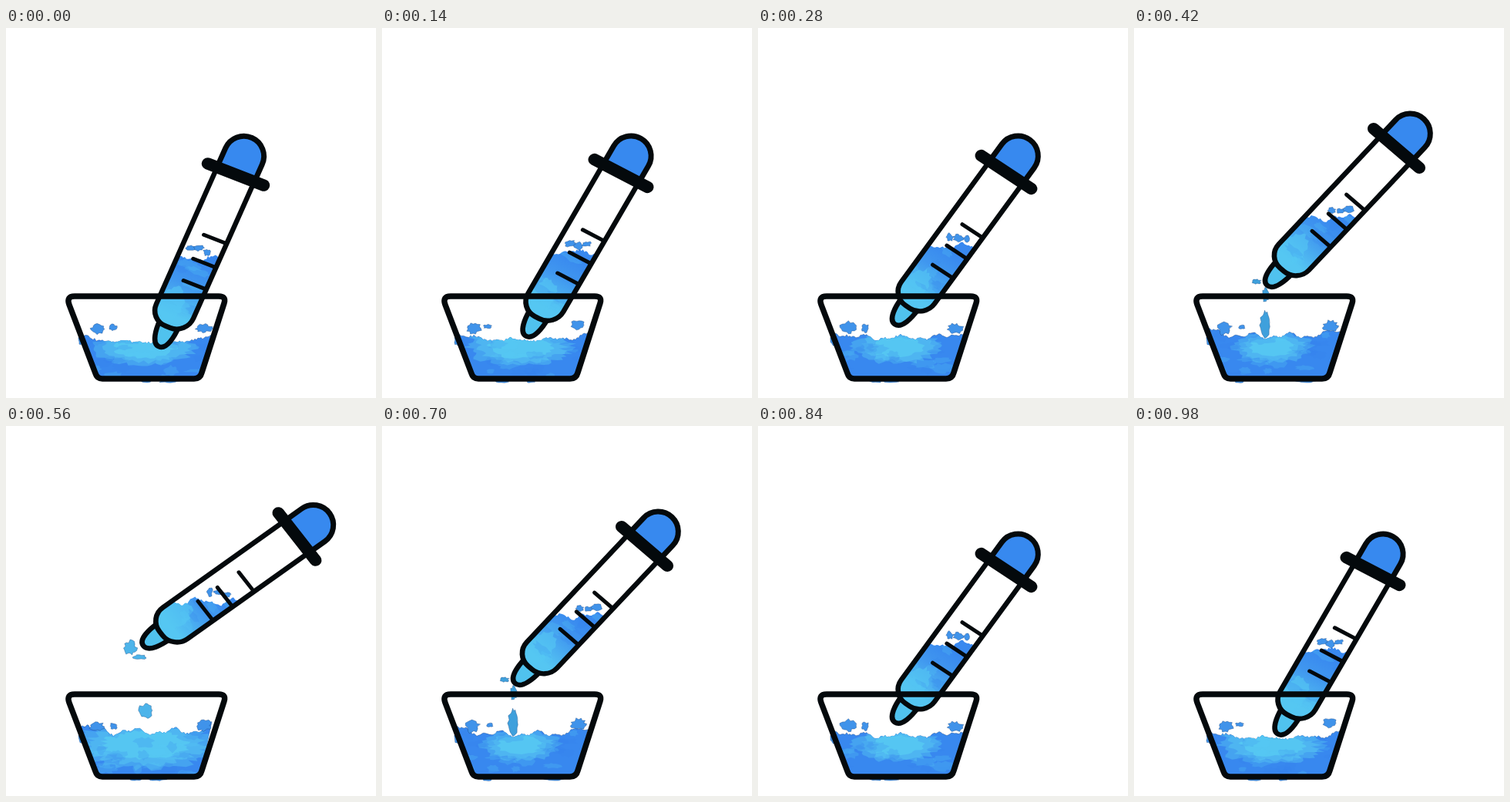
Recreate the animation shown at these times as an HTML page with a canvas. Size 480 by 480 pixels, loop 1120 ms.

```html
<!DOCTYPE html>
<html lang="en">
<head>
<meta charset="utf-8">
<title>Pipette and bowl</title>
<style>
html, body { margin: 0; width: 100%; height: 100%; overflow: hidden; background: #fff; }
canvas { display: block; width: 100vw; height: 100vh; }
</style>
</head>
<body>
<canvas id="stage" width="480" height="480"></canvas>
<script>
const ctx = document.getElementById('stage').getContext('2d');
const INK = '#04090c', BLUE = '#3888ef', MID = '#45a3f0', LIGHT = '#55c6f2';
const EDGE = 'rgba(20,65,120,.5)';
const STEP = 140;

// Flange centre, tilt in degrees, and width of the light patch in the bowl.
const poses = [
  { x: 298, y: 190, tilt: 24, glow: 54 },
  { x: 310, y: 188.5, tilt: 30.2, glow: 56 },
  { x: 322, y: 187, tilt: 36.2, glow: 46 },
  { x: 340.5, y: 156, tilt: 43.3, glow: 42 },
  { x: 377.5, y: 143.5, tilt: 54.6, glow: 76 }
];

const body = new Path2D('M-25.8 0V194A22.5 22.5 0 0 0 -3.3 216.5H3.3A22.5 22.5 0 0 0 25.8 194V0');
const tip = new Path2D('M-13 212C-13 224 -11 244.5 0 244.5S13 224 13 212');
const cap = new Path2D('M-26 0V-26A26 26 0 0 1 26 -26V0Z');
const marks = new Path2D('M-6 88H25M-6 122H25M-6 153H25');
const flange = new Path2D('M-39 0H39');
const bowl = new Path2D('M89 348H276Q286 348 283 357L254 447Q252 455 244 455H125Q118 455 116 448L82 359Q78 348 89 348Z');

let seed;
const rand = () => (seed = seed * 16807 % 2147483647) / 2147483647;
const wobble = n => (rand() - .5) * n;

// Choppy liquid surface between two x positions, closed far down by its foot.
function surface(from, to, height, chop, footFrom, footTo, footY) {
  const path = new Path2D(), a = rand() * 6, b = rand() * 6;
  for (let x = from; x <= to; x += 2)
    path.lineTo(x, height(x) + chop * (Math.sin(x / 8 + a) + Math.sin(x / 3.7 + b) * .6) + wobble(3));
  path.lineTo(footTo, footY);
  path.lineTo(footFrom, footY);
  path.closePath();
  return path;
}

function blob(x, y, rx, ry, rough = .55) {
  const path = new Path2D(), n = Math.round(8 + (rx + ry) * .7);
  for (let i = 0; i < n; i++) {
    const a = i / n * 2 * Math.PI, r = 1 + wobble(rough);
    path.lineTo(x + rx * r * Math.cos(a), y + ry * r * Math.sin(a));
  }
  path.closePath();
  return path;
}

function paint(path, fill, line, width) {
  if (fill) { ctx.fillStyle = fill; ctx.fill(path); }
  if (line) { ctx.strokeStyle = line; ctx.lineWidth = width; ctx.stroke(path); }
}

const splash = (x, y, rx, ry, color = '#4093ea') => paint(blob(x, y, rx, ry), color, EDGE, .7);

function mottle(x, y, w, h, count) {
  for (let i = 0; i < count; i++)
    paint(blob(x + rand() * w, y + rand() * h, 5 + rand() * 12, 2 + rand() * 5),
      i % 2 ? 'rgba(85,200,244,.25)' : 'rgba(50,125,235,.2)');
}

function drawWater(k, p) {
  const height = x => 407 - 2.5 * k - 8 * ((x - 183) / 85) ** 4;
  const pool = surface(97, 268, height, 1.2 + k * .5, 118, 252, 454);
  paint(pool, BLUE, EDGE, .7);
  ctx.save();
  ctx.clip(pool);
  [[1.2, MID], [1, '#4eb5f1'], [.72, LIGHT]].forEach(([s, color]) =>
    paint(blob(180, 414, p.glow * s, (6 + p.glow * .25) * s, .25), color));
  mottle(100, 395, 165, 58, 24);
  ctx.restore();

  for (const x of [119, 138, 256]) {
    const size = x === 138 ? 5 : 9;
    splash(x + wobble(4), 388 + wobble(6), size + wobble(2), size * .75 + wobble(3));
  }
  splash(97, 405, 3, 6);
  for (let i = 0; i < 2; i++) splash(135 + rand() * 100, 458, 5 + rand() * 8, 2);
}

// Drops fall from the tip once it has left the bowl.
function drawDrops(k) {
  if (k === 3) {
    splash(170, 383, 6, 16, '#3fa0dc');
    splash(171, 346, 4, 9, '#3fa0dc');
    splash(159, 329, 5, 3, '#3fa0dc');
  }
  if (k === 4) {
    splash(161, 288, 8, 9, '#4db4ea');
    splash(173, 300, 8, 3, '#4db4ea');
    splash(181, 369, 8, 9, '#4db4ea');
  }
}

function drawPipette(k, p) {
  const angle = p.tilt * Math.PI / 180;
  const level = p.y + 108 - 6 * k;
  const middle = p.x - (level - p.y) * Math.tan(angle);
  const place = (skew = -.047) => {
    ctx.setTransform(1, 0, 0, 1, p.x, p.y);
    ctx.rotate(angle);
    ctx.transform(1, skew, 0, 1, 0, 0);
  };

  ctx.save();
  place();
  paint(tip, '#50c2ee', INK, 6.5);
  const liquid = ctx.createLinearGradient(0, 125, 0, 200);
  liquid.addColorStop(0, BLUE);
  liquid.addColorStop(.4, '#4097ef');
  liquid.addColorStop(1, LIGHT);
  ctx.clip(body);
  ctx.resetTransform();
  ctx.clip(surface(middle - 60, middle + 60, () => level, 2 + k * .4, 100, 400, 480));
  place();
  ctx.fillStyle = liquid;
  ctx.fillRect(-40, 60, 80, 170);
  paint(blob(-8, 188, 15, 24, .25), 'rgba(85,200,244,.6)');
  mottle(-25, 110, 50, 85, 10);
  ctx.restore();

  for (let i = 0; i < 3; i++)
    splash(middle + 4 * k + (i - 1) * 11, level - 6 - rand() * 8, 3 + rand() * 4, 3 + rand() * 3);

  ctx.save();
  place();
  paint(body, null, INK, 6.5);
  paint(marks, null, INK, 5);
  place(0);
  paint(cap, '#3789ef', INK, 7);
  place();
  paint(flange, null, INK, 15.5);
  ctx.restore();
}

function draw(now) {
  const i = Math.floor(now / STEP) % 8;
  const k = Math.min(i, 8 - i), p = poses[k];
  seed = 382258049 * (k + 1) % 2147483647;
  ctx.clearRect(0, 0, 480, 480);
  ctx.lineCap = ctx.lineJoin = 'round';
  drawWater(k, p);
  drawDrops(k);
  drawPipette(k, p);
  paint(bowl, null, INK, 7.5);
}

const start = performance.now();
function tick() {
  draw(performance.now() - start);
  requestAnimationFrame(tick);
}
tick();
</script>
</body>
</html>
```
